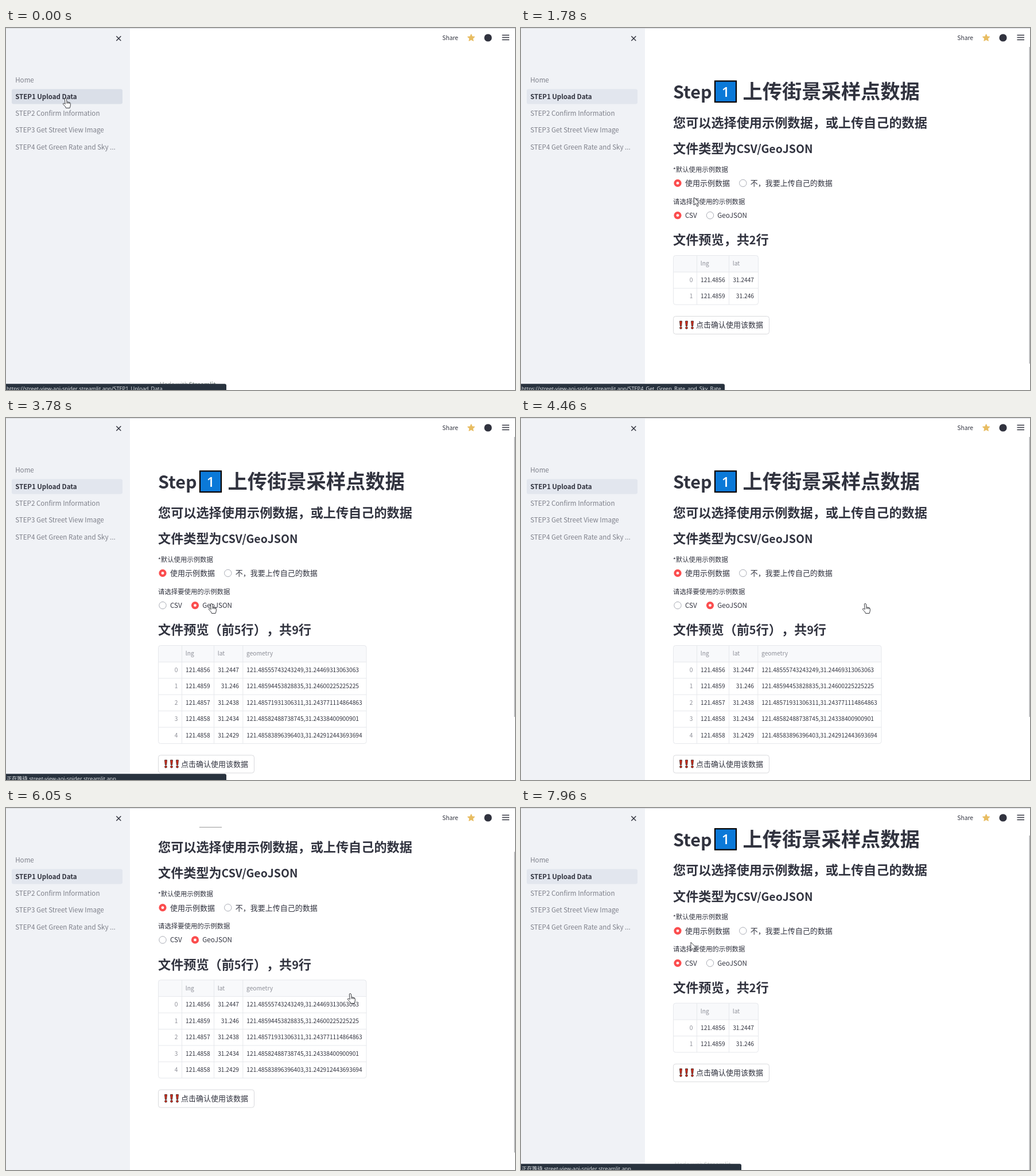
These frames come from a looping animation (887x631 px, 8000 ms). An HTML page:

```html
<!DOCTYPE html>
<html lang="zh-CN">
<head>
<meta charset="utf-8">
<title>Upload data</title>
<style>
html, body { margin: 0; width: 100%; height: 100%; overflow: hidden; background: #fff; }
svg { display: block; width: 887px; height: 631px; }
text { font-family: "Noto Sans CJK SC", "Noto Sans CJK JP", "Noto Sans", sans-serif; fill: #31333f; text-spacing-trim: space-all; white-space: pre; }
.link { font-family: "Open Sans", "Noto Sans CJK SC", sans-serif; fill: #e6e9ec; }
</style>
</head>
<body>
<svg id="stage" viewBox="0 0 887 631" xmlns="http://www.w3.org/2000/svg"></svg>
<script>
const LOOP = 8000, STEP = 66.7;
const INK = '#31333f', MUTED = '#7f818b', PALE = '#8d8f98', LINE = '#e6e8ec';
const LATIN = 1 / 1.117; // Latin glyphs of this face run large beside the ideographs

const rect = (x, y, w, h, fill, more = '') =>
  `<rect x="${x}" y="${y}" width="${w}" height="${h}" fill="${fill}" ${more}/>`;
const line = (d, stroke = LINE, w = 1) => `<path d="${d}" fill="none" stroke="${stroke}" stroke-width="${w}"/>`;
const text = (x, y, size, str, more = '') =>
  `<text x="${x}" y="${y}" font-size="${size}" ${more}>` +
  str.replace(/[\x21-\x7e][\x20-\x7e]*/g, s => `<tspan font-size="${(size * LATIN).toFixed(2)}">${s}</tspan>`) + '</text>';
const bold = (x, y, size, str) => text(x, y, size, str, 'font-weight="700"');
const color = c => `style="fill:${c}"`;
const group = (id, body, more = '') => `<g id="${id}" ${more}>${body}</g>`;

function radio(id, x, y) {
  return group(id,
    `<circle class="off" cx="${x}" cy="${y}" r="6.2" fill="#fff" stroke="#a9acb5"/>` +
    `<g class="on"><circle cx="${x}" cy="${y}" r="6.6" fill="#fb4d4e"/><circle cx="${x}" cy="${y}" r="2.4" fill="#fff"/></g>`);
}

function loading(id, y) {
  return group(id, rect(265, y, 571.5, 45, '#e8f2fb', 'rx="3"') + text(278, y + 27, 13, 'Loading...', color('#1b4673')));
}

function table(rows, edges) {
  const bottom = 425.3 + rows.length * 28.45, right = edges[edges.length - 1], w = right - 265.5;
  let s = rect(265.5, 396.5, w, 28.8, '#f8f9fb', 'rx="3"');
  ['lng', 'lat', 'geometry'].slice(0, edges.length - 1).forEach((name, i) => {
    s += text(edges[i] + 6.3, 414.3, 11.43, name, color(PALE));
  });
  rows.forEach((row, i) => {
    const y = 443 + i * 28.45;
    s += line(`M265.5 ${425.3 + i * 28.45}H${right}`);
    s += text(299.5, y, 11.43, String(i), 'text-anchor="end" ' + color(PALE));
    s += text(355.6, y, 11.43, row[0], 'text-anchor="end"') + text(406, y, 11.43, row[1], 'text-anchor="end"');
    if (row[2]) s += text(419.3, y, 11.43, row[2]);
  });
  edges.slice(0, -1).forEach(x => { s += line(`M${x} 396.5V${bottom}`); });
  return s + rect(265.5, 396.5, w, bottom - 396.5, 'none', `rx="4" stroke="${LINE}"`);
}

function button(y) {
  let s = rect(265.5, y, 167, 31, '#fff', 'rx="4" stroke="#d9dadd"');
  for (const x of [278.5, 288.5, 298.5]) {
    s += `<path d="M${x - 1.9} ${y + 8.4}h3.8l-.8 8.6h-2.2z" fill="#e5321f" stroke="#3a1512" stroke-width=".9"/>` +
      `<circle cx="${x}" cy="${y + 20.2}" r="1.8" fill="#e5321f" stroke="#3a1512" stroke-width=".9"/>`;
  }
  return s + text(305, y + 19.9, 13, '点击确认使用该数据');
}

const short = [['121.4856', '31.2447'], ['121.4859', '31.246']];
const long = [
  ['121.4856', '31.2447', '121.48555743243249,31.24469313063063'],
  ['121.4859', '31.246', '121.48594453828835,31.24600225225225'],
  ['121.4857', '31.2438', '121.48571931306311,31.243771114864863'],
  ['121.4858', '31.2434', '121.48582488738745,31.24338400900901'],
  ['121.4858', '31.2429', '121.48583896396403,31.242912443693694']
];

const title = bold(265, 123, 34.1, 'Step') +
  rect(338, 92.5, 37, 36.5, '#0b79d8', 'stroke="#000" stroke-width="2.2"') +
  `<text x="356.5" y="119.5" font-size="24" font-weight="600" text-anchor="middle" style="fill:#fff;font-family:'Open Sans',sans-serif">1</text>` +
  bold(386.5, 123.3, 34.25, '上传街景采样点数据');
const heads = bold(265, 172.7, 22.15, '您可以选择使用示例数据，或上传自己的数据') +
  bold(265, 218, 22.15, '文件类型为') + bold(375.6, 218, 21.7, 'CSV/GeoJSON');
const form = text(265, 250.5, 11.4, '*默认使用示例数据') + radio('own', 273, 270.4) +
  text(286, 275.3, 13, '使用示例数据') + radio('upload', 386.8, 270.4) + text(399.7, 275.3, 13, '不，我要上传自己的数据') +
  text(265, 306.8, 11.4, '请选择要使用的示例数据') + radio('csv', 273, 326.6) + text(286, 331.2, 13, 'CSV') +
  radio('geo', 329.5, 326.6) + text(342.3, 331.2, 13, 'GeoJSON');

const page = group('title', title) + group('heads', heads) + group('form', form) +
  group('two', bold(265, 377.4, 22.15, '文件预览，共2行') + group('twoTable', table(short, [306.5, 362.5, 413.5])) +
    loading('wait1', 396) + loading('wait2', 454.3) + group('twoButton', button(502.5))) +
  group('nine', bold(265, 377.4, 22.15, '文件预览（前5行），共9行') +
    table(long, [306.5, 362.5, 412.8, 628]) + button(587.8));

let side = rect(0, 0, 216, 631, '#f0f2f6') + rect(10, 106.5, 193, 26, '#e2e6ee', 'id="current" rx="3"') +
  line('M192.3 14.2l8 8m0-8l-8 8', INK, 1.5);
['Home', 'STEP1 Upload Data', 'STEP2 Confirm Information', 'STEP3 Get Street View Image', 'STEP4 Get Green Rate and Sky ...']
  .forEach((s, i) => {
    const y = 94.6 + i * 29.25;
    side += i === 1 ? bold(16.2, y, 12.8, s) : text(16.2, y, 12.94, s, color(MUTED));
  });

let star = '';
for (let i = 0; i < 10; i++) {
  const a = i * Math.PI / 5, r = i % 2 ? 2.9 : 6.2;
  star += `${(810.6 + r * Math.sin(a)).toFixed(2)},${(17.3 - r * Math.cos(a)).toFixed(2)} `;
}
const tools = text(760.3, 20.6, 11.5, 'Share') +
  `<polygon points="${star}" fill="#e8bd62" stroke="#e8bd62" stroke-width="1.2" stroke-linejoin="round"/>` +
  `<circle cx="840" cy="17" r="6.6" fill="${INK}"/>` + line('M864.5 12.6h12.5m-12.5 4h12.5m-12.5 4h12.5', INK, 1.5);

const stage = document.getElementById('stage');
stage.innerHTML = '<clipPath id="view"><rect x="216" y="33" width="671" height="598"/></clipPath>' +
  rect(0, 0, 887, 631, '#fff') +
  `<g clip-path="url(#view)">${group('page', page)}</g>` +
  group('footer', text(267.5, 625.3, 11.43, 'Made with ', color('#a3a8a6')) +
    text(318.5, 625.3, 11.43, 'Streamlit', 'font-weight="700" ' + color('#8f9894'))) +
  side + tools + rect(885.6, 33, 1.4, 552, '#b0b1b4', 'id="thumb"') + rect(0, 0, 887, 1, '#d6d8dc') +
  group('status', rect(-5, 620.3, 389, 20, '#28323e', 'id="bar" rx="3"') +
    '<text id="link" class="link" x="1" y="632.3" font-size="9.2"></text>') +
  '<circle id="click" r="10" fill="#f4e83c" opacity=".9"/>' +
  group('arrow', '<path d="M0 0V13.6l3.1-2.9 2.3 5.2 2.2-1-2.2-5H9.6z" fill="#fff" stroke="#34363c" stroke-width=".9"/>') +
  group('hand', '<path d="M-1.7 2Q-1.6.4-.2.4T1.4 2L2 6.8l4.5.8q2 .6 2 2.8l-.3 3.4-1.1 3.7H.4L-.6 15l-3.5-3.7q-1-1.7.3-2.2 1.2-.2 3 1.6z' +
    'M2 6.8v3m2.2-2.6v2.8m2.2-2.3v2.6" fill="#fff" stroke="#2f3136" stroke-width=".95" stroke-linejoin="round"/>');

const el = {};
stage.querySelectorAll('[id]').forEach(e => { el[e.id] = e; });
const show = (id, on) => { el[id].style.display = on ? '' : 'none'; };
const check = (id, on) => {
  el[id].querySelector('.on').style.display = on ? '' : 'none';
  el[id].querySelector('.off').style.display = on ? 'none' : '';
};
const clamp = v => Math.max(0, Math.min(1, v));
const between = (t, a, b) => t >= a && t < b;

// Pointer path: time, x, y
const path = [
  [1383, 104, 122], [1583, 150, 205], [1783, 301, 295], [2250, 358, 323],
  [4193, 358, 323], [4460, 600, 323],
  [6253, 600, 323], [6650, 430, 292], [6850, 241, 258], [7080, 296, 234]
];
const starts = [1383, 4193, 6253];

function pointer(t) {
  const from = starts.filter(s => s <= t).pop();
  if (from === undefined) return path[0].slice(1);
  const q = from + Math.floor((t - from) / STEP + 0.06) * STEP + 3;
  const i = path.findIndex(p => p[0] > q);
  if (i < 0) return path[path.length - 1].slice(1);
  const a = path[Math.max(0, i - 1)], b = path[i], k = clamp((q - a[0]) / (b[0] - a[0]));
  return [a[1] + (b[1] - a[1]) * k, a[2] + (b[2] - a[2]) * k];
}

const host = 'street-view-aoi-spider.streamlit.app';

function status(t) {
  if (t < 1517) return [`https://${host}/STEP1_Upload_Data`, 384];
  if (t < 2250) return [`https://${host}/STEP4_Get_Green_Rate_and_Sky_Rate`, 355];
  if (between(t, 3530, 3980) || t >= 7690) return ['正在等待 ' + host, 384];
  return null;
}

function draw(t) {
  const nine = between(t, 3660, 7820), geo = between(t, 3320, 7480);
  show('title', t >= 490);
  show('heads', t >= 560);
  show('form', t >= 630);
  show('two', t >= 700 && !nine);
  show('nine', nine);
  show('wait1', t < 970);
  show('wait2', t < 970);
  show('twoTable', t >= 970);
  show('twoButton', t >= 1040);
  check('own', true);
  check('upload', false);
  check('csv', !geo);
  check('geo', geo);
  el.geo.querySelector('.off').setAttribute('fill', between(t, 2320, 3320) ? '#eeeef0' : '#fff');

  const q = t < 5850 ? 0 : clamp((Math.floor((t - 5850) / STEP + 0.06) + 1) / 4);
  const scroll = t >= 7820 ? 56.3 : 96.7 * q * q * (3 - 2 * q);
  el.page.setAttribute('transform', `translate(0 ${-scroll})`);

  let a = 33, b = 585;
  if (nine) {
    a = t >= 6120 ? 111 : 33 + scroll * 0.448;
    b = 521 + scroll * 0.823;
  } else if (t >= 7820) { a = 48; b = 631; }
  show('thumb', t >= 1650);
  el.thumb.setAttribute('y', a);
  el.thumb.setAttribute('height', b - a);

  show('footer', t < 490 || t >= 7820);
  el.footer.setAttribute('opacity', t < 490 ? 1 : 0.4);

  const note = status(t);
  show('status', note);
  if (note) {
    el.link.textContent = note[0];
    el.bar.setAttribute('width', note[1] + 5);
    el.status.setAttribute('opacity', between(t, 2050, 2250) ? 1 - (t - 2050) / 200 : 1);
  }

  const [x, y] = pointer(t);
  const hand = t < 1650 || between(t, 2320, 6400) || between(t, 7150, 7820);
  show('hand', hand);
  show('arrow', !hand);
  for (const id of ['hand', 'arrow']) el[id].setAttribute('transform', `translate(${x} ${y})`);
  el.current.setAttribute('fill', t < 1450 ? '#dadfe8' : '#e2e6ee');
  show('click', between(t, 3120, 3250) || between(t, 7220, 7350));
  el.click.setAttribute('cx', x + 0.8);
  el.click.setAttribute('cy', y + 1);
}

function frame() {
  draw(performance.now() % LOOP);
  requestAnimationFrame(frame);
}
frame();
</script>
</body>
</html>
```
